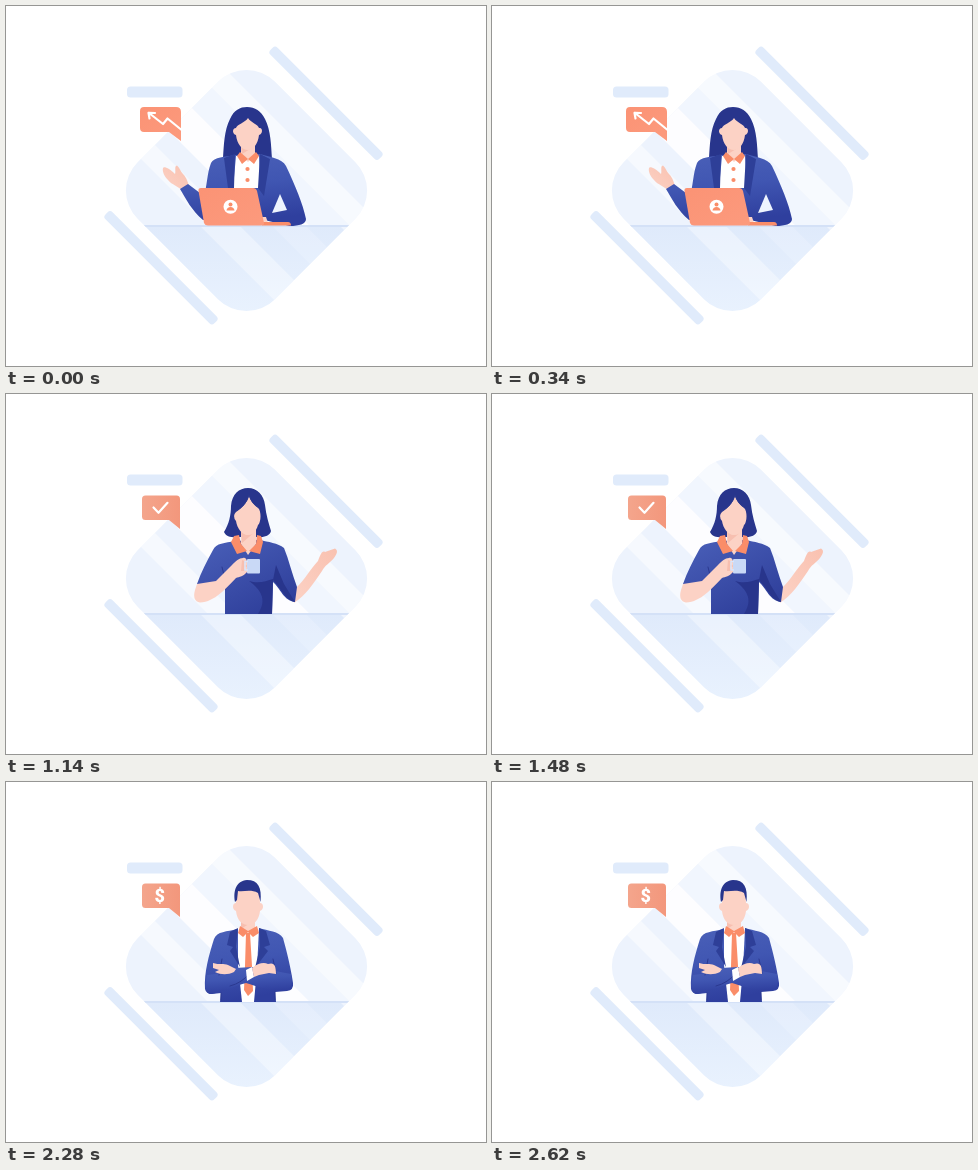
These frames come from a looping animation (480x360 px, 2.85 s). An HTML page:

```html
<!DOCTYPE html>
<html lang="en">
<head>
<meta charset="utf-8">
<title>Team at the desk</title>
<style>
html, body { margin: 0; width: 100%; height: 100%; overflow: hidden; background: #fff; }
svg { display: block; width: 480px; height: 360px; }
.suit { fill: url(#suit); }
.navy { fill: #28358c; }
.lapel { fill: #2e3f98; }
.skin { fill: #fcd2c5; }
.tan { fill: url(#tan); }
.shade { fill: #f7bfb0; }
.orange { fill: #fa8d69; }
.white { fill: #fff; }
.line { fill: none; stroke: #fff; stroke-width: 2.2; stroke-linejoin: round; stroke-linecap: round; }
.fold { fill: none; stroke: #2b3990; stroke-width: 1; stroke-linecap: round; }
</style>
</head>
<body>
<svg viewBox="0 0 480 360">
  <defs>
    <linearGradient id="suit" x1="0" y1="0" x2=".2" y2="1">
      <stop offset="0" stop-color="#4a60b8"/>
      <stop offset=".5" stop-color="#4056b2"/>
      <stop offset="1" stop-color="#2f3f9e"/>
    </linearGradient>
    <linearGradient id="shirt" x1="0" y1="0" x2=".7" y2="1">
      <stop offset="0" stop-color="#4a60b9"/>
      <stop offset="1" stop-color="#2f3f9b"/>
    </linearGradient>
    <linearGradient id="coral" x1="0" y1="0" x2="1" y2="1">
      <stop offset="0" stop-color="#fb9375"/>
      <stop offset="1" stop-color="#fc9a7d"/>
    </linearGradient>
    <linearGradient id="soft" x1="0" y1="0" x2="1" y2="0">
      <stop offset="0" stop-color="#f4a58c"/>
      <stop offset="1" stop-color="#f3977c"/>
    </linearGradient>
    <linearGradient id="tan" x1="0" y1="1" x2="1" y2="0">
      <stop offset="0" stop-color="#fcd2c5"/>
      <stop offset="1" stop-color="#f9c1b0"/>
    </linearGradient>
    <linearGradient id="desk" x1="0" y1="0" x2="0" y2="1">
      <stop offset="0" stop-color="#dfeafb"/>
      <stop offset="1" stop-color="#e9f2fe"/>
    </linearGradient>
    <clipPath id="tile"><rect x="143.500" y="87.500" width="194" height="194" rx="40" transform="rotate(45 240.5 184.5)"/></clipPath>
    <path id="bubble" fill="url(#soft)" d="M139.500 101.500H170.500Q174 101.500 174 105V135L163 126H139.500Q136 126 136 122.500V105Q136 101.500 139.500 101.500Z"/>
  </defs>

  <g clip-path="url(#tile)">
    <rect x="110" y="55" width="260" height="165" fill="#edf3fd"/>
    <g id="bands" fill="#fff"></g>
    <rect x="110" y="220" width="260" height="90" fill="url(#desk)"/>
    <g id="glare" fill="#fff"></g>
    <rect x="110" y="219" width="260" height="2" fill="#d4e1f7"/>
  </g>
  <g fill="#e0ebfb">
    <rect x="121" y="80.500" width="55.500" height="11" rx="3.500"/>
    <rect x="243" y="92.300" width="154" height="10" rx="3.500" transform="rotate(45 320 97.3)"/>
    <rect x="78" y="256.800" width="154" height="10" rx="3.500" transform="rotate(45 155 261.8)"/>
  </g>

  <g class="scene">
    <path fill="url(#coral)" d="M138 101H170Q175 101 175 106V135L163 126H138Q134 126 134 122V105Q134 101 138 101Z"/>
    <path class="line" stroke-linecap="butt" d="M143 107L157 118L161.500 112.500L175 123.500M143.500 112.500L142.500 106.800L149 107"/>
    <path class="navy" d="M217 152C218 139 218 125 224 113C228 104 234 101 241 101C249 101 255 105 259 113C265 125 265 139 266 153Z"/>
    <path class="tan" d="M157 162C158 160 164 163 169 168C170 165 168 160 171 159.500C174 162 174 165 177 168C181 172 182 177 183 180L177 185C172 180 166 179 162 174C159 171 156 166 157 162Z"/>
    <path class="suit" d="M229 149C219 151 208 151 205 157C201 167 201 181 198 190L182 178L174 183C180 193 186 205 197 214H258L284 220C293 220 300 218 300 213C297 198 289 179 280 160C276 152 263 151 254 148Z"/>
    <path fill="#eef4fe" d="M266 207L274 188L281 204Z"/>
    <path class="white" d="M230 150H253L255 182H227Z"/>
    <path class="lapel" d="M229 148L218 152L222 182H228ZM254 148L264 153L258 190L252 182Z"/>
    <path class="skin" d="M235 138H249V149L242 156L235 149Z"/>
    <path class="shade" d="M235 139Q241 146 249 140L236 148Z"/>
    <path class="skin" d="M230 122C231 118 239 117 242 112C245 117 252 118 253 122C257 121 257 128 253 129C252 138 247 144 242 144C236 144 231 138 230 129C226 128 226 122 230 122Z"/>
    <path class="orange" d="M234 146L242 153L236 158L231 150ZM250 146L242 153L248 158L253 150Z"/>
    <g class="orange"><circle cx="241.500" cy="163" r="2.100"/><circle cx="241.500" cy="174" r="2.100"/></g>
    <path class="skin" d="M256 211H260L262 217H256Z"/>
    <path class="orange" d="M256 216H282Q285 216 285 219.500H256Z"/>
    <path fill="url(#coral)" d="M195 182H247Q250 182 251 185L258 217Q258 219.500 255 219.500H202Q199 219.500 198 217L192.500 185Q192 182 195 182Z"/>
    <circle class="white" cx="224.500" cy="200.800" r="7"/>
    <g class="orange"><circle cx="224.500" cy="198.500" r="2"/><path d="M220.500 204.500Q221 201 224.500 201Q228 201 228.500 204.500Z"/></g>
  </g>

  <g class="scene">
    <use href="#bubble"/>
    <circle cx="154.800" cy="114" r="5" fill="none" stroke="#fff" stroke-width="3.200"/>
    <circle cx="154.800" cy="114" r="7.200" fill="none" stroke="#fff" stroke-width="2.200" stroke-dasharray="2.827" transform="rotate(-11 154.800 114)"/>
    <path class="tan" d="M141 148C145 145 151 150 156 153L157 149C160 150 160 154 161 157C164 159 165 163 167 167L162 172C157 167 151 166 147 160C143 156 141 152 141 148Z"/>
    <path class="tan" d="M342 151C337 149 331 152 328 155L327 152C323 154 323 158 322 161C319 163 318 167 318 169L323 175C328 170 334 167 338 161C341 157 342 154 342 151Z"/>
    <path class="suit" d="M231 148C222 150 213 151 208 159C203 167 199 177 192 184L167 164L160 171C169 181 178 192 189 200Q194 203 199 198L217 180L216 220H268L269 180C275 187 279 197 286 203Q291 206 296 203C306 195 315 185 325 175L319 168L292 184C286 176 283 166 277 158C272 151 261 150 252 148Z"/>
    <path class="fold" d="M217 180L219 170M269 180L267 169"/>
    <path class="white" d="M233 148H251L249 176L242 197L235 178Z"/>
    <path class="lapel" d="M233 147L224 150L221 160L226 161L224 165L242 198L234 170ZM251 147L260 150L263 160L258 161L260 165L242 198L250 170Z"/>
    <path class="skin" d="M234 138H250V149L242 153L234 149Z"/>
    <path class="skin" d="M231 109H253L254 122C258 121 258 128 254 130C253 139 248 143 242 143C236 143 231 138 230 130C226 128 226 121 230 122Z"/>
    <path class="navy" d="M229 121C228 112 229 104 236 102C242 99 249 99 251 101C257 102 257 111 255 122L253 114C246 113 239 114 233 111L231 122Z"/>
    <path class="navy" d="M230 124C231 132 235 130 242 130C249 130 252 132 254 124C257 135 251 144 242 145C233 144 227 135 230 124Z"/>
    <path fill="#fff3ef" d="M237 134Q242 132 246 134Q245 138 241.500 138Q238 138 237 134Z"/>
    <path class="orange" d="M234 148L242 151L250 148V156L242 153L234 156Z"/>
    <g class="navy"><circle cx="241.500" cy="162" r="1.600"/><circle cx="241.500" cy="174" r="1.600"/><circle cx="241.500" cy="186" r="1.600"/><circle cx="242" cy="199" r="1.400"/><circle cx="242" cy="209" r="1.400"/></g>
  </g>

  <g class="scene">
    <use href="#bubble"/>
    <path class="line" stroke-width="3" d="M147.500 113.500L152.500 118.800L161.500 108.800"/>
    <path class="navy" d="M218 138C223 130 225 121 225 112C226 100 233 94 242 94C251 94 258 101 259 111C260 121 263 130 265 137C264 142 257 144 250 143H234C227 144 220 143 218 138Z"/>
    <path class="tan" d="M288 209L290 194C298 187 305 174 312 167C314 162 316 156 319 158L329 154.500C333 157 330 161 328 164C324 169 319 171 316 177C308 189 299 202 288 209Z"/>
    <path fill="url(#shirt)" d="M229 147C219 149 210 149 207 156C201 167 195 178 191 190L210 194L219 184V220H266L267 188C274 194 278 207 289 208L291 193C286 180 283 166 278 154C272 149 262 148 254 146Z"/>
    <path class="navy" d="M267 186L270 171L278 190L289 208C279 206 275 194 267 186ZM243 187C253 190 260 187 267 185L266 220H252C262 205 254 195 243 187Z"/>
    <path class="fold" d="M219 185L216 173"/>
    <path class="skin" d="M235 136H250V150L242 161L235 150Z"/>
    <path class="shade" d="M235 137Q242 145 250 137L236 149Z"/>
    <path class="skin" d="M230 118C236 114 241 109 243 102C245 109 250 112 253 115C256 121 254 130 252 131C250 138 246 141 242 141C236 141 231 134 230 127Q226 122 230 118Z"/>
    <path class="fold" stroke="#6572bc" d="M243 101Q240 112 230 117M243 101Q246 110 252 113"/>
    <path class="orange" d="M233 141L228 142L225 148L231 160L241 157L235 150ZM251 141L255 142L257 148L254 160L243 157L250 150Z"/>
    <path class="skin" d="M191 190L210 187L226 171C230 167 233 164 237 164C241 163 242 168 241 178C238 182 233 183 230 184C220 194 209 208 194 208.500Q186 207 189 196Z"/>
    <path class="shade" d="M236 166L241 168L238 170L242 172L238 174L241 177L235 177Z"/>
    <rect x="241" y="165" width="13" height="14.500" rx="1" fill="#c9d9f6"/>
    <path d="M242 167.500H239V176H242" fill="none" stroke="#dbe6fa" stroke-width="1.500"/>
  </g>

  <g class="scene">
    <use href="#bubble"/>
    <g class="white"><circle cx="144.700" cy="114" r="3"/><circle cx="154.700" cy="114" r="3"/><circle cx="164.700" cy="114" r="3"/></g>
    <path class="tan" d="M270 184L283 180L288 187L307 158C305 151 308 145 309 141C312 142 311 147 313 146C316 140 319 134 323 133C326 137 323 145 322 150C320 156 315 159 313 164C307 182 301 199 293 208Q289 212 284 208C278 203 274 194 270 184Z"/>
    <path fill="url(#shirt)" d="M228 149C217 151 211 152 208 158C203 166 198 173 194 180L212 188L216 181L213 220H270L269 184L285 179C281 169 278 159 271 153C267 150 261 150 254 149Z"/>
    <path class="lapel" d="M269 184L268 169L277 182ZM250 202L269 190V220H244Z" opacity=".35"/>
    <path class="fold" d="M216 181L218 169M269 184L267 168"/>
    <path class="skin" d="M228 149L235 146V138H249V146L255 149Q252 161 242 162Q231 161 228 149Z"/>
    <path d="M227.500 149Q230 163 242 163.500Q254 163 256 149" fill="none" stroke="#2b3990" stroke-width="2.800"/>
    <path d="M242 164V184" stroke="#2b3990" stroke-width="2.800"/>
    <path class="shade" d="M235 138Q242 145 249 139L235 147Z"/>
    <path class="skin" d="M231 109H253L254 121C258 121 258 128 254 129C253 139 248 144 242 144C236 144 231 138 230 129C226 128 226 121 230 121Z"/>
    <path class="navy" d="M229 122C228 113 229 104 236 102C237 99 248 98 251 102C257 105 256 115 255 122L252 113C245 110 238 114 232 112L231 122Z"/>
    <path class="skin" d="M195 181L211 188L202 204L225 205C230 202 236 203 239 203L246 206L241 208L245 210L243 215C238 218 233 216 225 213C211 215 196 217 185 214Q180 212 182 206Z"/>
    <path class="shade" d="M236 207L244 205L241 208L245 210L239 212Z"/>
  </g>

  <g class="scene">
    <use href="#bubble"/>
    <text x="153.800" y="120" text-anchor="middle" font-family="Roboto, sans-serif" font-weight="900" font-size="18" fill="#fff">$</text>
    <path class="suit" d="M231 147C221 150 211 149 208 157C203 173 198 190 199 207Q200 212 206 212L215 211L214 220H270L269 210L281 209Q288 208 287 201C285 187 281 170 277 156C273 149 262 149 253 146Z"/>
    <path class="white" d="M232 146H253L251 187L248 220H236L232 183Z"/>
    <path class="lapel" d="M232 146L224 150L221 163L227 165L224 169L234 185L230 165ZM253 146L260 149L264 163L258 165L262 169L249 186L254 165Z"/>
    <path class="skin" d="M235 137H249V146L242 151L235 146Z"/>
    <path class="shade" d="M235 138Q242 145 249 138L235 147Z"/>
    <path class="orange" d="M234 144L242 149L251 144L253 151L247 155L242 150L237 155L232 151ZM240 151H244L246 184L247 209L242 214L238 208L239 184Z"/>
    <path class="skin" d="M231 105H253L254 121C258 121 258 128 254 129C253 138 248 143 242 143C236 143 231 138 230 129C226 128 226 121 230 121Z"/>
    <path class="navy" d="M229 120C227 109 230 99 241 98C252 98 256 105 254.500 120L252 111C245 107 238 110 232 109L231 118Z"/>
    <path class="suit" d="M201 193C212 192 221 190 229 186L246 185L269 189L285 192Q288 205 280 208C265 210 250 204 240 201C228 204 217 211 204 212Q197 210 201 193Z"/>
    <path class="fold" d="M213 193L216 177M270 191L267 177M224 204Q236 201 244 191M215 211V218M269 210V218"/>
    <path class="skin" d="M207 181C213 183 218 181 222 183L230 187L228 190C222 193 215 193 209 190L213 188L207 186Z"/>
    <path class="white" d="M240 188L246 185L248 195L241 199Z"/>
    <path class="skin" d="M246 186C252 181 258 180 262 182C268 180 270 183 270 192L263 191L253 193L248 195Z"/>
  </g>
</svg>
<script>
const LOOP = 2850;

// Diagonal strip between the lines x - y = a and x - y = b.
function strip(id, a, b, top, bottom, alpha) {
  const p = document.createElementNS("http://www.w3.org/2000/svg", "polygon");
  p.setAttribute("points", [a + top, top, b + top, top, b + bottom, bottom, a + bottom, bottom].join(" "));
  p.setAttribute("opacity", alpha);
  document.getElementById(id).append(p);
}
strip("bands", 38, 84, 50, 220, 0.88);
strip("bands", -18, 10, 50, 220, 0.5);
strip("bands", 84, 124, 50, 220, 0.2);
strip("bands", 124, 156, 50, 220, 0.6);
strip("glare", -26, 14, 220, 310, 0.35);
strip("glare", 46, 80, 220, 310, 0.15);
strip("glare", 114, 150, 220, 310, 0.5);

const scenes = [...document.querySelectorAll(".scene")];
scenes.forEach((scene, i) => {
  const steps = [...scenes, null].map((_, k) => ({
    opacity: k === i ? 1 : 0,
    offset: k / scenes.length,
    easing: "steps(1, end)"
  }));
  scene.animate(steps, { duration: LOOP, iterations: Infinity });
});
</script>
</body>
</html>
```
